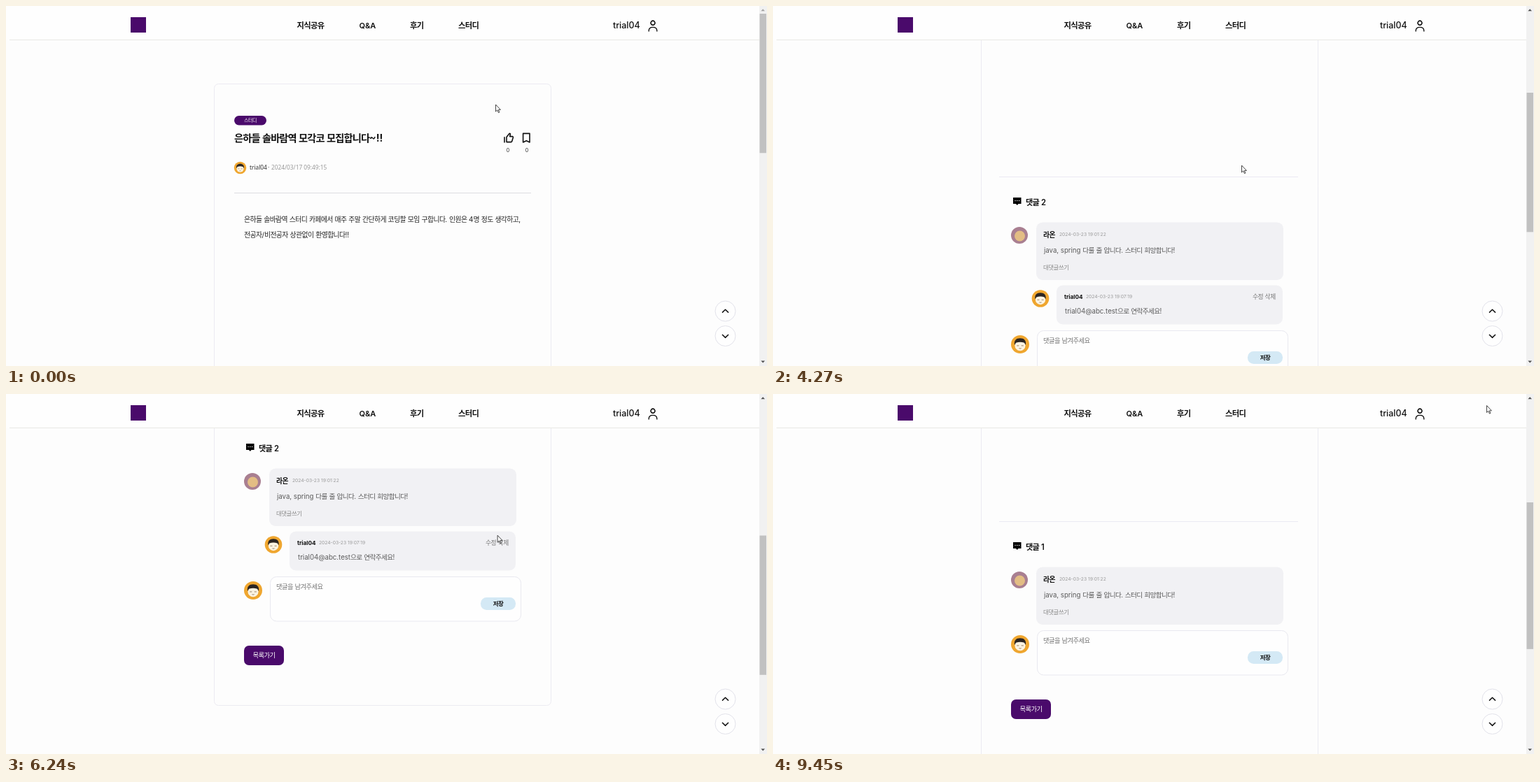
Animation, 1087 px wide and 515 px high, one loop 9490 ms. Source, as an HTML page with a canvas:

```html
<!DOCTYPE html>
<html lang="ko">
<head>
<meta charset="utf-8">
<title>스터디 모집</title>
<style>
html, body { margin: 0; width: 100%; height: 100%; overflow: hidden; background: #fdfdfd; }
canvas { display: block; width: 1087px; height: 515px; }
</style>
</head>
<body>
<canvas id="stage" width="1087" height="515"></canvas>
<script>
const ctx = document.getElementById('stage').getContext('2d');
const W = 1087, H = 515, LOOP = 9490;
const SANS = 'Inter, "Noto Sans CJK KR", "Noto Sans CJK", sans-serif';
const NOTO = '"Noto Sans", sans-serif';
const INK = '#111', GREY = '#999', PURPLE = '#4a0a6b', PAGE = '#fdfdfd';
const USER = 'trial04';

// Scrolling: each wheel notch eases over a fixed time.
const NOTCH = 70.7, NOTCH_MS = 180;
const DELETED_AT = 7100, REPLY_SPACE = 64;
const WHEEL_BEFORE = [3890, 3955, 4020, 4090, 4230, 4430, 4630];
const WHEEL_AFTER = [8190, 8320, 8450, 8580, 8710];

// Pointer stops: time, x, y.
const POINTER = [
  [0, 699.5, 141], [1000, 699.5, 141], [1900, 669.5, 228], [5300, 669.5, 228],
  [6200, 702, 202], [6700, 707, 212], [7200, 707, 212], [8100, 667.5, 283],
  [8900, 667.5, 283], [9400, 1019.5, 16.5], [LOOP, 1019.5, 16.5]
];

const clamp = v => Math.max(0, Math.min(1, v));
const ease = v => { const p = clamp(v); return p * p * (3 - 2 * p); };

function scrollAt(t) {
  const wheel = t < DELETED_AT ? WHEEL_BEFORE : WHEEL_AFTER;
  return NOTCH * wheel.reduce((sum, start) => sum + ease((t - start) / NOTCH_MS), 0);
}

function pointerAt(t) {
  const i = Math.max(1, POINTER.findIndex(p => p[0] > t));
  const [t0, x0, y0] = POINTER[i - 1], [t1, x1, y1] = POINTER[i];
  const p = ease((t - t0) / (t1 - t0));
  return [x0 + (x1 - x0) * p, y0 + (y1 - y0) * p];
}

// Hangul is set slightly tighter than Latin; cy is the optical middle.
function text(str, x, cy, size, { color = INK, weight = 400, font = SANS, center = false } = {}) {
  ctx.font = `${weight} ${size}px ${font}`;
  ctx.fillStyle = color;
  const runs = str.split(/([가-힣]+)/).filter(Boolean).map(s => {
    const gap = /[가-힣]/.test(s) ? `${-0.06 * size}px` : '0px';
    ctx.letterSpacing = gap;
    return { s, gap, w: ctx.measureText(s).width };
  });
  if (center) x -= runs.reduce((sum, r) => sum + r.w, 0) / 2;
  for (const { s, gap, w } of runs) {
    ctx.letterSpacing = gap;
    ctx.fillText(s, x, cy + size * 0.36);
    x += w;
  }
}

function box(x, y, w, h, r, fill, stroke) {
  ctx.beginPath();
  ctx.roundRect(x, y, w, h, r);
  paint(fill, stroke, 1);
}

function disc(x, y, r, fill, stroke) {
  ctx.beginPath();
  ctx.arc(x, y, r, 0, Math.PI * 2);
  paint(fill, stroke, 1);
}

function paint(fill, stroke, width) {
  if (fill) { ctx.fillStyle = fill; ctx.fill(); }
  if (stroke) { ctx.strokeStyle = stroke; ctx.lineWidth = width; ctx.stroke(); }
}

function path(d, x, y, fill, stroke, width = 1.5) {
  ctx.save();
  ctx.translate(x, y);
  const p = new Path2D(d);
  if (fill) { ctx.fillStyle = fill; ctx.fill(p); }
  if (stroke) {
    ctx.strokeStyle = stroke;
    ctx.lineWidth = width;
    ctx.lineJoin = 'round';
    ctx.stroke(p);
  }
  ctx.restore();
}

function rule(x0, x1, y, color) {
  ctx.fillStyle = color;
  ctx.fillRect(x0, y, x1 - x0, 1);
}

function avatar(x, y, r) {
  disc(x, y, r, '#efa62f');
  ctx.save();
  ctx.translate(x, y);
  ctx.scale(r / 12, r / 12);
  disc(0, 1.5, 7, '#fbf3e2');
  path('M-7.3 1C-8.5-5-5-8 0-8S8.5-5 7.3 1L5.5-2Q0-4-5.5-2Z', 0, 0, '#2b2522');
  path('M-4.5 1.8h3M1.5 1.8h3M-1.5 5.2q1.5 1 3 0', 0, 0, null, '#8a7358', 0.8);
  ctx.restore();
}

function post() {
  box(326, 157, 46, 13.5, 6.7, PURPLE);
  text('스터디', 349, 163.5, 6.9, { color: '#fff', weight: 500, center: true });
  text('은하들 솔바람역 모각코 모집합니다~!!', 326, 189, 14.2, { weight: 700 });

  path('M1 6.3V14.4M4 13.6V6.6L8.2 1.2Q9.8 1.2 9.3 3L8.6 5.6H12.2Q13.6 5.8 13.3 7.2L11.7 12.6Q11.4 13.6 10.4 13.6Z',
    711, 181, null, INK, 1.6);
  path('M0 0H9.4V12.6L4.7 10.4L0 12.6Z', 738.6, 182.4, null, INK, 1.6);
  for (const x of [717, 744]) text('0', x, 206.5, 7, { color: '#222', center: true });

  avatar(334.5, 231.5, 8.7);
  text(USER, 348, 231.5, 8.3, { color: '#333', font: NOTO });
  text('·', 374, 231.5, 8.3, { color: '#555', font: NOTO });
  text('2024/03/17 09:49:15', 379, 231.5, 8.3, { color: GREY, font: NOTO });
  rule(326, 750, 267, '#dcdce1');

  const body = { color: '#222' };
  text('은하들 솔바람역 스터디 카페에서 매주 주말 간단하게 코딩할 모임 구합니다. 인원은 4명 정도 생각하고,',
    340, 305.5, 9.85, body);
  text('전공자/비전공자 상관없이 환영합니다!!', 340, 327, 9.85, body);
}

function comments(deleted) {
  rule(323, 750, 536, '#ebeaf3');
  path('M0 0H11.5V9H7.5L5.75 11L4 9H0Z', 343, 566, '#000');
  for (const x of [346, 348.8, 351.6]) disc(x, 570.5, 0.7, '#fff');
  text('댓글 ' + (deleted ? 1 : 2), 361, 573, 11.2, { weight: 600 });

  const panel = '#f1f1f4', soft = { color: '#5a5a5a' }, stamp = { color: GREY };
  box(376, 601.5, 353, 82.5, 9, panel);
  disc(352, 620, 12, '#a97f91');
  disc(352.5, 621, 7.5, '#e3bd84');
  text('라온', 386, 619, 9.8, { weight: 600 });
  text('2024-03-23 19:01:22', 409, 619, 6.7, stamp);
  text('java, spring 다룰 줄 압니다. 스터디 희망합니다!', 387, 641.3, 9.65, soft);
  text('대댓글쓰기', 386, 666, 8.5, { color: '#8a8a8a' });

  if (!deleted) {
    box(405, 691.5, 323, 56, 9, panel);
    avatar(382, 710.5, 12.3);
    text(USER, 416, 708, 8.2, { weight: 700 });
    text('2024-03-23 19:07:19', 447, 708, 6.7, stamp);
    text('수정 삭제', 685, 708, 8.8, { color: '#777' });
    text(USER + '@abc.test으로 연락주세요!', 417, 728.5, 9.65, soft);
  }
}

function replyForm() {
  avatar(353, 776, 13);
  box(377.5, 756.5, 358, 63.5, 9, '#fefefe', '#e9e9f0');
  text('댓글을 남겨주세요', 386, 771, 9.3, { color: '#757575' });
  box(678, 786, 50, 18, 8.5, '#d4e9f5');
  text('저장', 703, 795, 8.5, { weight: 700, center: true });
  box(340, 855, 57, 28, 7, PURPLE);
  text('목록가기', 368.5, 869, 9.3, { color: '#fff', weight: 500, center: true });
}

function header() {
  ctx.fillStyle = '#fefefe';
  ctx.fillRect(0, 0, 1076, 48);
  rule(5, 1076, 48, '#e9e9e4');
  box(178, 16, 22, 22, 0, PURPLE);
  const nav = { weight: 600 };
  text('지식공유', 415.5, 28, 11.3, nav);
  text('Q&A', 504.5, 28, 11, nav);
  text('후기', 577, 28, 11.3, nav);
  text('스터디', 646, 28, 11.3, nav);
  text(USER, 867, 27.5, 12.4, { weight: 500 });
  disc(924, 24.6, 3.1, null, INK);
  path('M0 6.2V5Q0 0 5.8 0T11.6 5V6.2M2.9-6.4A2.9 3 0 1 0 8.7-6.4A2.9 3 0 1 0 2.9-6.4Z', 918.2, 28.2 + 2.2, null, INK, 1.4);
}

function floatingButtons() {
  disc(1027.5, 436.5, 14.5, '#fefefe', '#e2e2ea');
  disc(1027.5, 472, 14.5, '#fefefe', '#e2e2ea');
  path('M0 4.4L4.5 0L9 4.4', 1023, 434.2, null, INK);
  path('M0 0L4.5 4.4L9 0', 1023, 470, null, INK);
}

function scrollbar(scroll, pageHeight) {
  const track = 493, scale = track / pageHeight;
  ctx.fillStyle = '#f1f1f1';
  ctx.fillRect(1076, 0, 11, H);
  ctx.fillStyle = '#c1c1c1';
  ctx.fillRect(1076.5, 11 + scroll * scale, 9.5, H * scale);
  path('M0 3L2.8 0L5.6 3Z', 1078.4, 4.3, scroll > 0 ? '#505050' : '#a3a3a3');
  path('M0 0L2.8 3L5.6 0Z', 1078.4, 507.5, '#505050');
}

function draw(t) {
  const deleted = t >= DELETED_AT;
  const lift = deleted ? REPLY_SPACE : 0;
  const scroll = scrollAt(t);

  ctx.fillStyle = PAGE;
  ctx.fillRect(0, 0, W, H);

  ctx.save();
  ctx.translate(0, -Math.round(scroll));
  box(297.5, 111.5, 481, 829 - lift, 6, null, '#ecebf2');
  post();
  comments(deleted);
  ctx.translate(0, -lift);
  replyForm();
  ctx.restore();

  header();
  floatingButtons();
  scrollbar(scroll, 1274 - lift);
  path('M0 0V10L2.3 7.9L3.9 11.6L5.4 11L3.8 7.4H6.9Z', ...pointerAt(t), '#fff', '#333', 0.9);
}

function frame(now) {
  draw(now % LOOP);
  requestAnimationFrame(frame);
}
requestAnimationFrame(frame);
</script>
</body>
</html>
```
